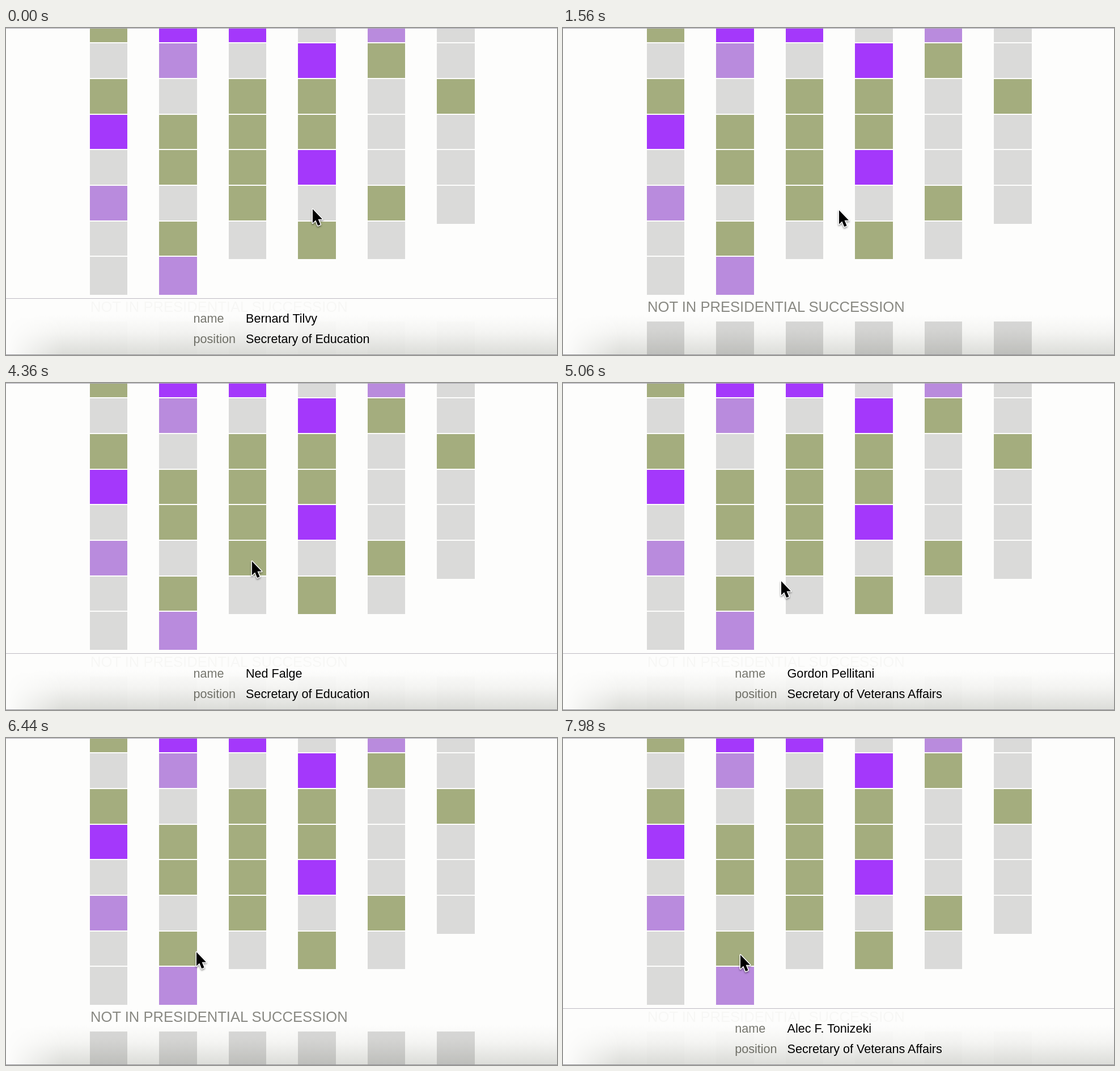
An HTML page that plays this animation: 972 px wide and 576 px high, repeating every 8000 ms.

```html
<!DOCTYPE html>
<html lang="en">
<head>
<meta charset="utf-8">
<title>Cabinet succession</title>
<style>
  html, body { margin: 0; width: 100%; height: 100%; overflow: hidden; }
  body { background: #fdfdfc; font-family: "Liberation Sans", Arial, sans-serif; }
  #stage { position: relative; width: 972px; height: 576px; overflow: hidden; isolation: isolate; background: #fdfdfc; }
  #stage > *, .cell { position: absolute; }

  .cell { width: 66.5px; }
  .O { background: #a4ad7e; }
  .L { background: #dadad9; }
  .P { background: #b98bdd; }
  .V { background: #a438fb; }

  .heading { left: 149px; top: 477px; font-size: 25.6px; line-height: 28px; white-space: nowrap; color: #898983; }

  .panel {
    left: 0; top: 476px; width: 972px; height: 99px; box-sizing: border-box;
    border-top: 1px solid #bdbbc2; background: #fdfdfcf1;
    display: grid; grid-template-columns: auto auto; grid-auto-rows: 36px;
    column-gap: 18px; justify-content: center; align-content: start; padding-top: 17px;
    font-size: 21.6px; line-height: 36px; white-space: nowrap;
    opacity: 0; animation: 8s step-end infinite;
  }
  .panel b { font-weight: normal; color: #77776f; }

  .haze {
    left: 0; top: 500px; width: 972px; height: 75px; mix-blend-mode: multiply;
    background: linear-gradient(#fff 8%, #f6f6f5 48%, #dedfdc);
    -webkit-mask: linear-gradient(90deg, #0000, #000 100px);
    mask: linear-gradient(90deg, #0000, #000 100px);
  }
  .edge { left: 0; width: 972px; height: 1px; }

  #cursor { left: 0; top: 1px; overflow: visible; animation: wander 8s linear infinite; filter: drop-shadow(0 2px 1.5px #0006); }

  @keyframes first  { 0% { opacity: 1 } 13%, 100% { opacity: 0 } }
  @keyframes second { 0% { opacity: 0 } 27% { opacity: 1 } 61%, 100% { opacity: 0 } }
  @keyframes third  { 0% { opacity: 0 } 61% { opacity: 1 } 63.6%, 100% { opacity: 0 } }
  @keyframes fourth { 0% { opacity: 0 } 81%, 100% { opacity: 1 } }
  @keyframes wander {
    0%     { transform: translate(540px, 317px) }
    6%     { transform: translate(537px, 317px) }
    13%    { transform: translate(513px, 318px) }
    19.5%  { transform: translate(486px, 319px) }
    27%    { transform: translate(458px, 315px) }
    35.25% { transform: translate(447px, 312px) }
    54.5%  { transform: translate(433px, 312px) }
    61%    { transform: translate(397px, 340px) }
    63.25% { transform: translate(384px, 347px) }
    80.5%  { transform: translate(335px, 375px) }
    99.75%, 100% { transform: translate(312px, 380px) }
  }
</style>
</head>
<body>
<main id="stage">
  <section id="cells"></section>
  <div class="heading">NOT IN PRESIDENTIAL SUCCESSION</div>
  <div class="panel" style="animation-name:first"><b>name</b><span>Bernard Tilvy</span><b>position</b><span>Secretary of Education</span></div>
  <div class="panel" style="animation-name:second"><b>name</b><span>Ned Falge</span><b>position</b><span>Secretary of Education</span></div>
  <div class="panel" style="animation-name:third"><b>name</b><span>Gordon Pellitani</span><b>position</b><span>Secretary of Veterans Affairs</span></div>
  <div class="panel" style="animation-name:fourth"><b>name</b><span>Alec F. Tonizeki</span><b>position</b><span>Secretary of Veterans Affairs</span></div>
  <div class="haze"></div>
  <div class="edge" style="top:0;background:#aaa8b2"></div>
  <div class="edge" style="top:575px;background:#96959a"></div>
  <svg id="cursor" width="20" height="34">
    <path d="M1 1V25.5L6.3 20.4L10.2 30L14.6 28.2L10.6 18.8H18Z" fill="#000" stroke="#fff" stroke-width="3" stroke-linejoin="round" paint-order="stroke"/>
  </svg>
</main>
<script>
  // O olive, L light grey, P lilac, V violet, from top to bottom.
  const columns = ['OLOVLPLL', 'VPLOOLOP', 'VLOOOOL', 'LVOOVLO', 'POLLLOL', 'LLOLLL'];
  const cells = document.getElementById('cells');

  function addCell(column, top, height, kind) {
    const cell = document.createElement('div');
    cell.className = 'cell ' + kind;
    cell.style.cssText = `left:${147.5 + column * 122.5}px;top:${top}px;height:${height}px`;
    cells.append(cell);
  }

  columns.forEach((kinds, column) => {
    [...kinds].forEach((kind, row) =>
      addCell(column, -35.5 + row * 62.7, row === kinds.length - 1 ? 66.6 : 60.8, kind));
    addCell(column, 517, 67, 'L');
  });
</script>
</body>
</html>
```
